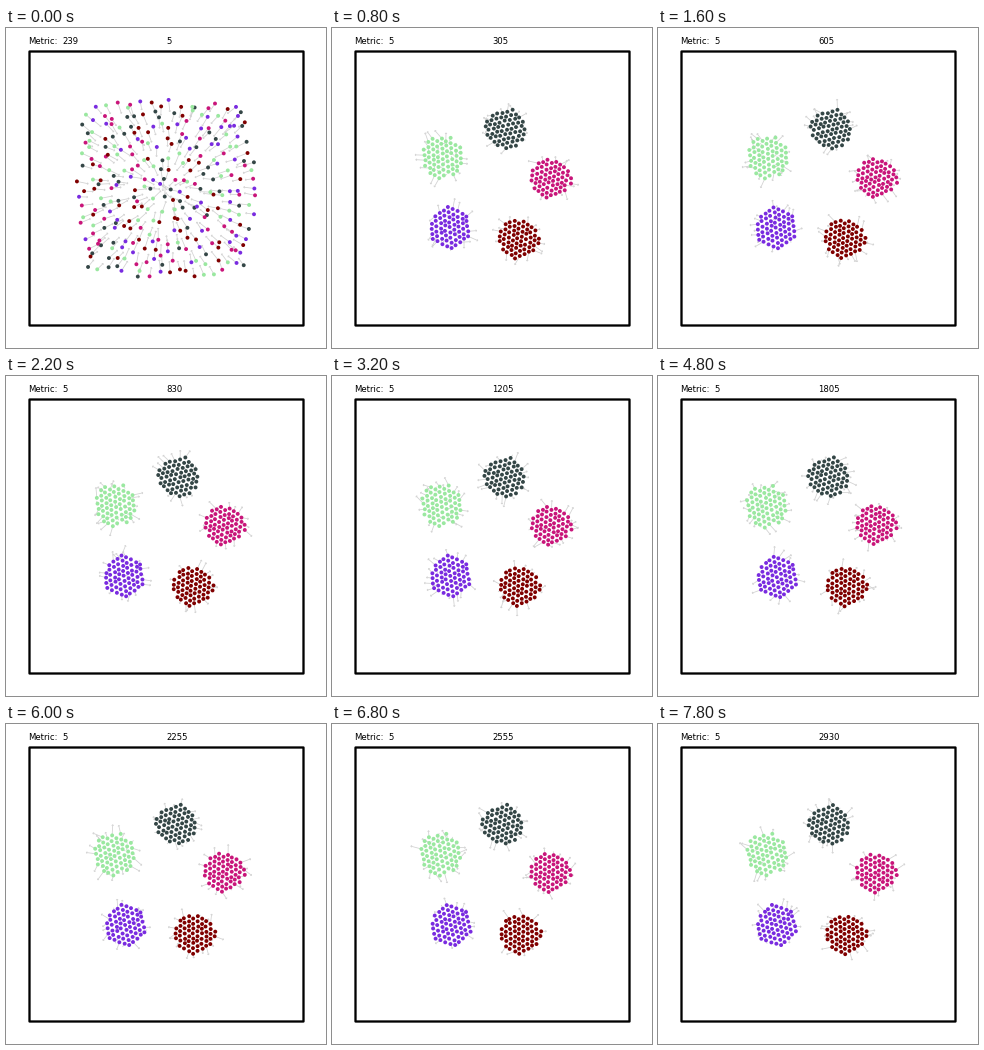
A matplotlib script for the animation above (8000 ms loop, 320 by 320 pixels).

```python
import numpy as np
import matplotlib.pyplot as plt
from matplotlib.animation import FuncAnimation
from matplotlib.collections import LineCollection
from matplotlib.patches import Rectangle

SIZE, DPI = 320, 100
PX = 72 / DPI
FRAMES, INTERVAL = 40, 200
PER_GROUP = 60
COLORS = ["#344646", "#9ae8a0", "#c9157a", "#792be0", "#800000"]
MIDDLE = np.array([160.0, 160.0])

# Drift of each group's centre over time (ms)
TIMES = [800, 2200, 3200, 4800, 6000, 7800]
PATHS = [
    ([173, 172, 172, 170, 169.5, 170.5], [101, 101, 101.5, 101, 100.5, 101]),
    ([110.5, 109.5, 109.5, 108.5, 108.5, 109], [130, 130, 130, 131, 131, 131]),
    ([219, 219, 219.5, 218.5, 218.5, 218.5], [150.5, 149.5, 149.5, 148.5, 148, 149]),
    ([118, 118, 118.5, 119, 119.5, 118.5], [199.5, 200, 200, 201, 201, 201]),
    ([187.5, 187.5, 188.5, 189.5, 189.5, 189], [211.5, 211, 211, 211, 210.5, 211]),
]
GATHER = [0, 0.58, 0.86, 0.96, 1]
METRIC = [239, 58, 15, 7, 5]


def turn(pts, angle):
    c, s = np.cos(angle), np.sin(angle)
    return pts @ np.array([[c, s], [-s, c]])


def packed_disc(rng, radius=19.3):
    """Hexagonal packing, cut to a rounded clump and slightly loosened."""
    col, row = np.meshgrid(np.arange(-8, 9), np.arange(-8, 9))
    grid = np.column_stack([(col + row % 2 / 2).ravel(), row.ravel() * 0.866])
    grid = turn(grid + rng.uniform(-0.5, 0.5, 2), rng.uniform(0, np.pi / 3))
    pts = grid[np.argsort(np.hypot(*grid.T))[:PER_GROUP]]
    pts = pts + rng.normal(0, 0.05, pts.shape)
    low, high = pts.min(axis=0), pts.max(axis=0)
    return (pts - (low + high) / 2) * radius / ((high - low) / 2).mean()


def scattered(rng):
    """Jittered grid in a slightly bulging square, in random order."""
    gx, gy = np.meshgrid(np.linspace(-1, 1, 18), np.linspace(-1, 1, 17))
    pts = np.column_stack([gx.ravel(), gy.ravel()]) * 0.97
    pts = pts + rng.uniform(-0.05, 0.05, pts.shape)
    pts = pts * (1 - 0.1 * pts[:, ::-1] ** 2)
    return MIDDLE + 88 * rng.permutation(pts)[: PER_GROUP * len(COLORS)]


def match(start, slots):
    """Order the slots so that each start point gets a near one."""
    free = list(range(len(slots)))
    order = []
    for p in start:
        best = min(free, key=lambda i: np.hypot(*(slots[i] - p)))
        free.remove(best)
        order.append(best)
    return slots[order]


def centre(group, ms):
    xs, ys = PATHS[group]
    return np.array([np.interp(ms, TIMES, xs), np.interp(ms, TIMES, ys)])


rng = np.random.default_rng(12)
start = scattered(rng).reshape(len(COLORS), PER_GROUP, 2)
clumps = []
for g in range(len(COLORS)):
    home = centre(g, 800)
    clumps.append(match(start[g] - home, packed_disc(rng)))


def positions(k, noise):
    p = GATHER[min(k, len(GATHER) - 1)]
    groups = []
    for g, clump in enumerate(clumps):
        settled = centre(g, k * INTERVAL) + turn(clump, -0.004 * k)
        settled = settled + noise.normal(0, 0.15, settled.shape)
        groups.append(start[g] + p * (settled - start[g]))
    return np.array(groups)


def arrows(k, groups, noise):
    """Heading strokes: inward while scattered, ragged outward once gathered."""
    lines = []
    for dots in groups:
        mid = MIDDLE if k == 0 else dots.mean(axis=0)
        for dot in dots:
            dx, dy = dot - mid
            angle = np.arctan2(dy, dx)
            if k == 0:
                angle += np.pi + noise.normal(0, 0.12)
                length = noise.uniform(8, 12)
            elif np.hypot(dx, dy) > 15.5 and noise.random() < 0.55:
                angle += noise.normal(0, 0.5)
                length = noise.uniform(4, 11)
            else:
                angle = noise.uniform(0, 2 * np.pi)
                length = noise.uniform(1, 4)
            tip = dot + length * np.array([np.cos(angle), np.sin(angle)])
            lines.append([dot, tip])
            if length > 4:
                for side in (-0.75, 0.75):
                    a = angle + np.pi + side
                    lines.append([tip, tip + 1.4 * np.array([np.cos(a), np.sin(a)])])
    return lines


fig = plt.figure(figsize=(SIZE / DPI, SIZE / DPI), dpi=DPI, facecolor="white")
ax = fig.add_axes([0, 0, 1, 1])
ax.set_xlim(0, SIZE)
ax.set_ylim(SIZE, 0)
ax.axis("off")
ax.add_patch(Rectangle((23.5, 23.5), 274, 274, fill=False, ec="black",
                       lw=2.3 * PX, joinstyle="round", snap=False))

font = dict(family="DejaVu Sans", fontsize=8.5 * PX, color="black", va="baseline")
ax.text(22.5, 16.2, "Metric:", **font)
metric = ax.text(56, 16.2, "", **font)
counter = ax.text(160.3, 16.2, "", **font)
strokes = LineCollection([], colors="#d2d2d2", linewidths=0.8 * PX, zorder=2)
ax.add_collection(strokes)
dots = ax.scatter(*start.reshape(-1, 2).T, s=(3.9 * PX) ** 2, linewidths=0,
                  c=np.repeat(COLORS, PER_GROUP), zorder=3)


def update(k):
    noise = np.random.default_rng(100 + k)
    groups = positions(k, noise)
    dots.set_offsets(groups.reshape(-1, 2))
    strokes.set_segments(arrows(k, groups, noise))
    metric.set_text(str(METRIC[min(k, len(METRIC) - 1)]))
    counter.set_text(str(5 + 75 * k))
    return dots, strokes, metric, counter


anim = FuncAnimation(fig, update, frames=FRAMES, interval=INTERVAL,
                     repeat=True, repeat_delay=0, blit=False)
plt.show()
```
